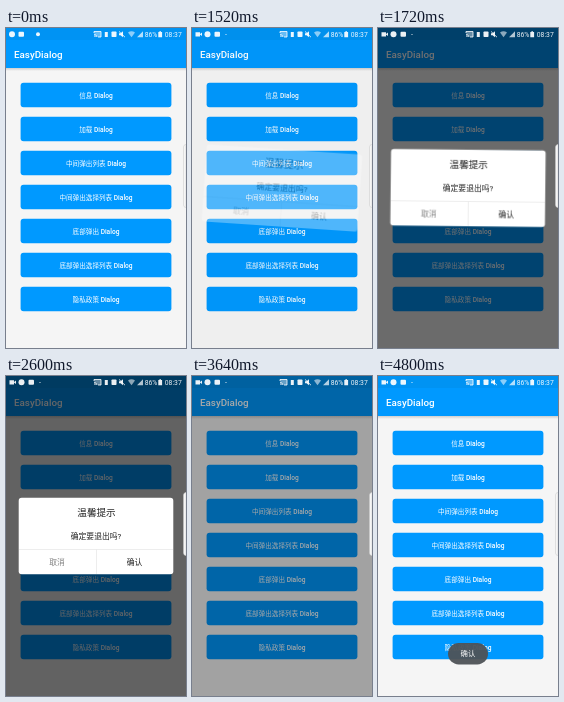
Write an HTML page that moves like this. It is 180x320 px and loops after 4.84 s.

```html
<!DOCTYPE html>
<html lang="zh-CN">
<head>
<meta charset="utf-8">
<title>EasyDialog</title>
<style>
  html, body { margin: 0; width: 100%; height: 100%; overflow: hidden; background: #f5f5f5; }
  svg { display: block; width: 180px; height: 320px; font-family: Roboto, "Noto Sans CJK SC", sans-serif; }
  .mid { text-anchor: middle; }
  .label { font-size: 6.6px; fill: #fff; }
  .label tspan { font-weight: 500; }
  .dim, .dialog, .toast, .idle, .rec { animation: 4840ms linear infinite; }
  .dim { animation-name: dim; }
  .dialog { animation-name: dialog; transform-origin: 90px 160px; }
  .toast { animation-name: toast; }
  .idle { animation-name: idle; }
  .rec { animation-name: rec; }

  @keyframes dim {
    0%, 31.24% { opacity: 0; }
    35.85%, 73.66% { opacity: .6; }
    77.31%, 100% { opacity: 0; }
  }
  @keyframes dialog {
    0%, 30.58% { opacity: 0; transform: rotate(0deg); }
    31.4% { opacity: .3; transform: rotate(4deg) scale(1.01); }
    32.44% { opacity: .75; transform: rotate(-3deg); }
    33.47% { opacity: 1; transform: rotate(2deg); }
    34.5% { transform: rotate(-1deg); }
    35.54% { transform: rotate(.6deg); }
    36.36%, 73.66% { opacity: 1; transform: rotate(0deg); }
    74.9%, 100% { opacity: 0; transform: rotate(0deg); }
  }
  @keyframes toast {
    0%, 81.2% { opacity: 0; }
    85.33%, 100% { opacity: 1; }
  }
  @keyframes idle {
    0%, 1.65% { opacity: 1; }
    1.66%, 100% { opacity: 0; }
  }
  @keyframes rec {
    0%, 1.65% { opacity: 0; }
    1.66%, 100% { opacity: 1; }
  }
</style>
</head>
<body>
<svg viewBox="0 0 180 320">
  <defs>
    <linearGradient id="shade" x2="0" y2="1">
      <stop stop-color="#000" stop-opacity=".16"/>
      <stop offset="1" stop-color="#000" stop-opacity="0"/>
    </linearGradient>
  </defs>

  <rect width="180" height="320" fill="#f5f5f5"/>
  <rect width="180" height="40" fill="#09f"/>
  <rect width="180" height="12" fill="#0093f3"/>
  <rect y="40" width="180" height="3" fill="url(#shade)"/>
  <text x="8" y="29.7" font-size="9.8" font-weight="500" fill="#fff">EasyDialog</text>
  <g id="buttons"></g>

  <rect class="dim" width="180" height="320"/>

  <g class="dialog">
    <rect x="12.7" y="121.7" width="154.6" height="76.6" rx="3" fill="#fff"/>
    <path d="M13 173.5H167M90.5 173.5V198" stroke="#e6e6e6" stroke-width=".7"/>
    <g class="mid" fill="#222">
      <text x="90.5" y="140" font-size="9.6">温馨提示</text>
      <text x="90" y="162.5" font-size="7.8">确定要退出吗?</text>
      <text x="51" y="188.7" font-size="7.8" fill="#808080">取消</text>
      <text x="128.5" y="188.7" font-size="7.8" font-weight="500">确认</text>
    </g>
  </g>

  <g class="toast">
    <rect x="70" y="267" width="40" height="21.5" rx="10.7" fill="#4e5357" fill-opacity=".95"/>
    <text class="mid" x="90" y="280.3" font-size="7.4" fill="#fff">确认</text>
  </g>

  <!-- Status bar stays bright above the dimmed window -->
  <g fill="#fff" fill-opacity=".92">
    <g class="idle">
      <circle cx="6" cy="6.2" r="3"/>
      <rect x="12.5" y="3.8" width="5.5" height="5" rx="1"/>
      <circle cx="32" cy="6.2" r="2"/>
    </g>
    <g class="rec">
      <path d="M3.5 4.2H8V8.4H3.5ZM8 6L10 4.6V8L8 6.6Z"/>
      <circle cx="15.5" cy="6.2" r="3"/>
      <rect x="22.5" y="3.8" width="5.5" height="5" rx="1"/>
      <circle cx="34" cy="6.5" r=".6"/>
    </g>
    <path d="M88 5V3.5H95V9H92M88 6.2Q90.5 6.5 91 9M88 7.7Q89.2 7.8 89.4 9" fill-opacity=".4" stroke="#fff" stroke-width=".8"/>
    <rect x="98.8" y="4" width="3" height="5"/>
    <rect x="105.5" y="3.5" width="5" height="5.5" rx=".8"/>
    <path d="M113 5.2H114.5L117 3.2V9.2L114.5 7.2H113Z"/>
    <path d="M113 3.4L119 9.2" stroke="#fff" stroke-width=".8"/>
    <path d="M122 4.6Q125.5 2 129 4.6L125.5 9.2Z" fill-opacity=".55"/>
    <path d="M131 9.2H137V3.2Z" fill-opacity=".7"/>
    <text x="138.7" y="9" font-size="6.8">86%</text>
    <path d="M152.3 4H153.4V3.2H155V4H156.1V9.2H152.3Z"/>
    <text x="158.8" y="9" font-size="6.8">08:37</text>
  </g>
  <path d="M180 116.5H179.5Q177.5 117 177.5 119V177Q177.5 179 179.5 179.5H180Z" fill="#f6f6f6" stroke="#c8c8c8" stroke-width=".5"/>
</svg>
<script>
  const labels = ["信息", "加载", "中间弹出列表", "中间弹出选择列表", "底部弹出", "底部弹出选择列表", "隐私政策"];
  document.getElementById("buttons").innerHTML = labels.map((label, i) => {
    const y = 55 + 34 * i;
    return `<rect x="14.6" y="${y - .3}" width="150.8" height="24.6" rx="3" fill="#09f"/>
      <text class="mid label" x="90" y="${y + 14.5}">${label} <tspan>Dialog</tspan></text>`;
  }).join("");
</script>
</body>
</html>
```
